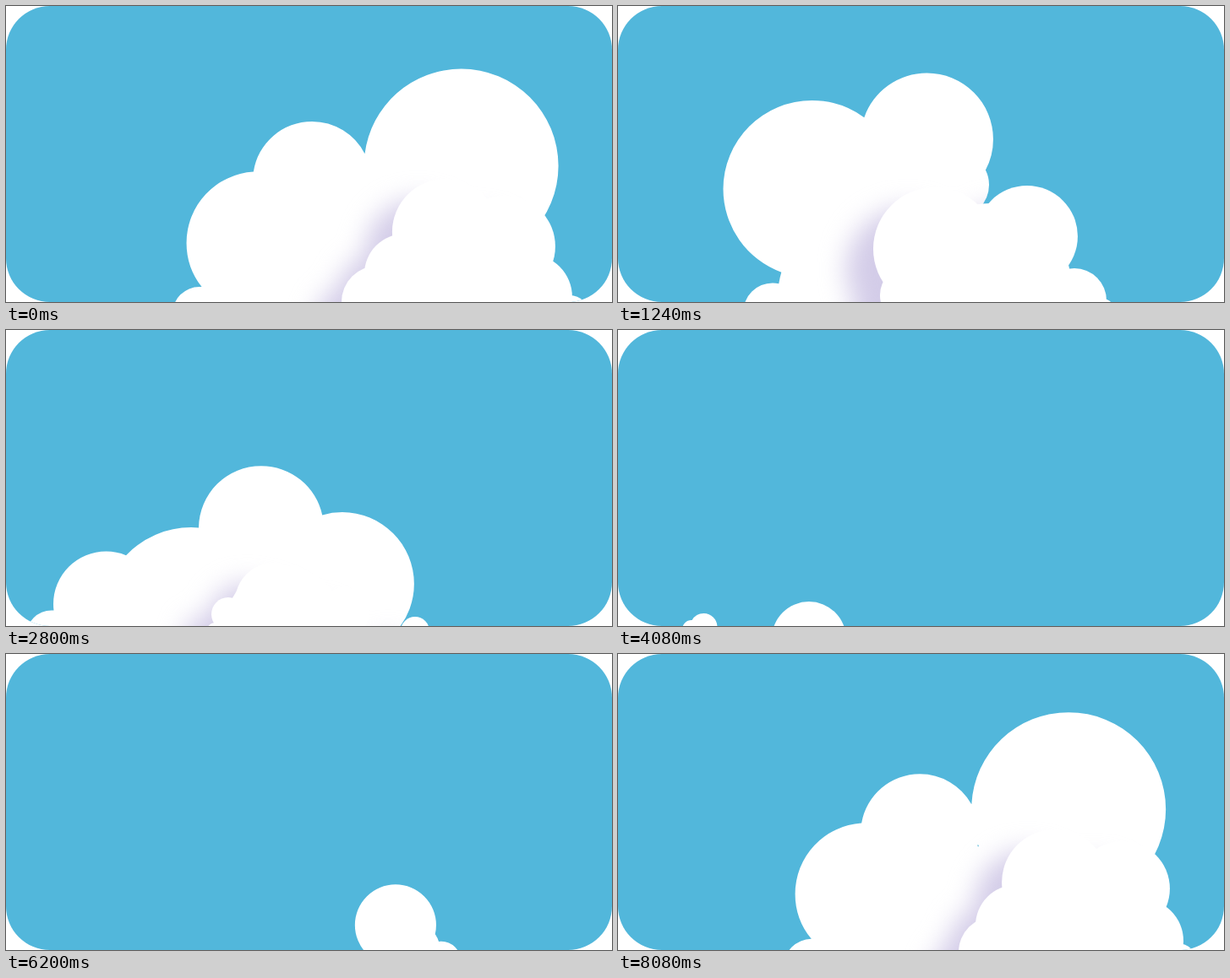
Recreate the animation shown at these times as an HTML page without scripts. Size 717x351 px, loop 8120 ms.

```html
<!DOCTYPE html>
<html lang="en">
<head>
<meta charset="utf-8">
<title>Drifting cloud</title>
<style>
html, body { margin: 0; width: 100%; height: 100%; overflow: hidden; background: #fff; }
svg { display: block; width: 100vw; height: 100vh; }
circle { animation: 8.12s linear infinite; }

/* back puffs */
.left { animation-name: left; }
.top { animation-name: top; }
.big { animation-name: big; }
.low { animation-name: low; }
.tip { animation-name: tip; }
.ear { animation-name: ear; }
.side { animation-name: side; }
.core { animation-name: core; }

/* front puffs */
.f-head { animation-name: f-head; }
.f-right { animation-name: f-right; }
.f-low { animation-name: f-low; }
.f-left { animation-name: f-left; }
.f-foot { animation-name: f-foot; }
.f-tip { animation-name: f-tip; }
.f-core { animation-name: f-core; }

@keyframes left {
  0%, to { cx: 298px; cy: 281px; r: 84.5px }
  2.956% { cx: 312px; cy: 263px; r: 88px }
  15.271% { cx: 229.5px; cy: 217px; r: 105px }
  34.483% { cx: 219px; cy: 340px; r: 106px }
  50.246% { cx: 160px; cy: 425px; r: 50px }
  58.13% { cx: 160px; cy: 440px; r: 0px }
  67.98% { cx: 500px; cy: 380px; r: 25px }
  76.355% { cx: 461px; cy: 321.5px; r: 48px }
  88.177% { cx: 362.5px; cy: 224.5px; r: 105px }
  97.537% { cx: 283px; cy: 290px; r: 85px }
  99.507% { cx: 293.5px; cy: 284.5px; r: 84px }
}
@keyframes top {
  0%, to { cx: 362px; cy: 207px; r: 70px }
  2.956% { cx: 380px; cy: 185px; r: 72px }
  15.271% { cx: 365.5px; cy: 158px; r: 78.5px }
  23.15% { cx: 335px; cy: 133px; r: 78px }
  34.483% { cx: 302px; cy: 235px; r: 74px }
  41.38% { cx: 266px; cy: 312px; r: 60px }
  50.246% { cx: 226px; cy: 366px; r: 44px }
  58.13% { cx: 190px; cy: 380px; r: 28px }
  67.98% { cx: 490px; cy: 390px; r: 0px }
  76.355% { cx: 455px; cy: 335px; r: 15px }
  88.177% { cx: 365px; cy: 235px; r: 60px }
  97.537% { cx: 341px; cy: 232px; r: 69px }
  99.507% { cx: 357px; cy: 212.5px; r: 70px }
}
@keyframes big {
  0%, to { cx: 538.5px; cy: 189.5px; r: 115px }
  2.956% { cx: 560px; cy: 214px; r: 112px }
  15.271% { cx: 400px; cy: 212px; r: 39px }
  34.483% { cx: 398px; cy: 301px; r: 85px }
  41.38% { cx: 331px; cy: 345px; r: 72px }
  50.246% { cx: 280px; cy: 410px; r: 30px }
  58.13% { cx: 280px; cy: 420px; r: 0px }
  67.98% { cx: 530px; cy: 390px; r: 10px }
  76.355% { cx: 515px; cy: 364px; r: 23px }
  88.177% { cx: 496px; cy: 174px; r: 75px }
  97.537% { cx: 513px; cy: 170px; r: 115px }
  99.507% { cx: 533px; cy: 184px; r: 115px }
}
@keyframes low {
  0%, to { cx: 229px; cy: 365px; r: 32px }
  15.271% { cx: 183px; cy: 363px; r: 34.5px }
  23.15% { cx: 125px; cy: 345px; r: 58px }
  34.483% { cx: 118.5px; cy: 325px; r: 62.5px }
  50.246% { cx: 101.5px; cy: 352px; r: 16px }
  58.13% { cx: 85px; cy: 368px; r: 8px }
  67.98% { cx: 440px; cy: 420px; r: 0px }
  76.355% { cx: 420px; cy: 400px; r: 20px }
  88.177% { cx: 328px; cy: 372px; r: 41px }
  99.507% { cx: 229px; cy: 371px; r: 33px }
}
@keyframes tip {
  0%, 23.15%, 58.13%, to { cx: 90px; cy: 380px; r: 0px }
  34.483% { cx: 54px; cy: 363px; r: 30.5px }
  50.246% { cx: 87px; cy: 355px; r: 11px }
}
@keyframes ear {
  0%, to { cx: 560px; cy: 217px; r: 60px }
  15.271% { cx: 410px; cy: 230px; r: 0px }
  67.98% { cx: 520px; cy: 400px; r: 0px }
  76.355% { cx: 500px; cy: 375px; r: 15px }
  88.177% { cx: 526px; cy: 212px; r: 41px }
  99.507% { cx: 557px; cy: 213px; r: 60px }
}
@keyframes side {
  0%, to { cx: 502px; cy: 276px; r: 40px }
  15.271% { cx: 420px; cy: 300px; r: 0px }
  67.98% { cx: 490px; cy: 410px; r: 0px }
  76.355% { cx: 480px; cy: 380px; r: 20px }
  88.177% { cx: 475px; cy: 274px; r: 51px }
  99.507% { cx: 500px; cy: 280px; r: 40px }
}
@keyframes core {
  0%, to { cx: 400px; cy: 330px; r: 110px }
  15.271% { cx: 292px; cy: 345px; r: 103px }
  34.483% { cx: 330px; cy: 345px; r: 90px }
  41.38% { cx: 280px; cy: 380px; r: 60px }
  50.246% { cx: 200px; cy: 440px; r: 40px }
  58.13% { cx: 200px; cy: 450px; r: 0px }
  67.98% { cx: 500px; cy: 390px; r: 15px }
  76.355% { cx: 487px; cy: 348px; r: 26px }
  88.177% { cx: 420px; cy: 345px; r: 80px }
  99.507% { cx: 400px; cy: 333px; r: 108px }
}

@keyframes f-head {
  0%, to { cx: 520px; cy: 268px; r: 63px }
  15.271% { cx: 375px; cy: 288px; r: 73px }
  34.483% { cx: 317px; cy: 322px; r: 46px }
  45.813% { cx: 290px; cy: 390px; r: 0px }
  76.355% { cx: 520px; cy: 430px; r: 10px }
  88.177% { cx: 533px; cy: 341.5px; r: 54px }
  99.507% { cx: 517px; cy: 271px; r: 63px }
}
@keyframes f-right {
  0%, to { cx: 590px; cy: 285px; r: 60px }
  15.271% { cx: 484px; cy: 273px; r: 60px }
  34.483% { cx: 400px; cy: 335px; r: 30px }
  45.813% { cx: 360px; cy: 390px; r: 0px }
  76.355% { cx: 540px; cy: 420px; r: 10px }
  88.177% { cx: 565px; cy: 352px; r: 35px }
  97.537% { cx: 600px; cy: 254px; r: 54px }
  99.507% { cx: 597px; cy: 278px; r: 56px }
}
@keyframes f-low {
  0%, to { cx: 619px; cy: 345px; r: 51px }
  15.271% { cx: 540px; cy: 349px; r: 38px }
  34.483% { cx: 484px; cy: 357px; r: 17px }
  45.813% { cx: 450px; cy: 390px; r: 0px }
  76.355% { cx: 550px; cy: 420px; r: 0px }
  88.177% { cx: 560px; cy: 375px; r: 20px }
  99.507% { cx: 619px; cy: 340px; r: 50px }
}
@keyframes f-left {
  0%, to { cx: 472px; cy: 318px; r: 48px }
  15.271% { cx: 345px; cy: 343px; r: 35px }
  34.483% { cx: 263px; cy: 337px; r: 20px }
  45.813% { cx: 240px; cy: 380px; r: 0px }
  76.355% { cx: 510px; cy: 420px; r: 0px }
  88.177% { cx: 505px; cy: 378px; r: 25px }
  99.507% { cx: 471px; cy: 322px; r: 48px }
}
@keyframes f-foot {
  0%, to { cx: 440px; cy: 351px; r: 43px }
  15.271% { cx: 380px; cy: 350px; r: 35px }
  34.483% { cx: 248px; cy: 358px; r: 11px }
  45.813% { cx: 230px; cy: 380px; r: 0px }
  76.355% { cx: 510px; cy: 420px; r: 0px }
  88.177% { cx: 505px; cy: 390px; r: 20px }
  99.507% { cx: 446px; cy: 354px; r: 43px }
}
@keyframes f-tip {
  0%, to { cx: 667px; cy: 366px; r: 23px }
  15.271% { cx: 573px; cy: 362px; r: 15px }
  34.483% { cx: 520px; cy: 380px; r: 0px }
  76.355% { cx: 590px; cy: 420px; r: 0px }
  88.177% { cx: 600px; cy: 385px; r: 10px }
  99.507% { cx: 662px; cy: 366px; r: 23px }
}
@keyframes f-core {
  0%, to { cx: 530px; cy: 345px; r: 90px }
  15.271% { cx: 440px; cy: 330px; r: 96px }
  34.483% { cx: 330px; cy: 350px; r: 70px }
  45.813% { cx: 290px; cy: 400px; r: 0px }
  76.355% { cx: 530px; cy: 420px; r: 10px }
  88.177% { cx: 540px; cy: 365px; r: 50px }
  99.507% { cx: 528px; cy: 347px; r: 90px }
}
</style>
</head>
<body>
<svg viewBox="0 0 717 351">
  <defs>
    <clipPath id="card"><rect width="717" height="351" rx="52"/></clipPath>
    <clipPath id="back">
      <circle class="left"/>
      <circle class="top"/>
      <circle class="big"/>
      <circle class="low"/>
      <circle class="tip"/>
      <circle class="ear"/>
      <circle class="side"/>
      <circle class="core"/>
    </clipPath>
    <filter id="soft" filterUnits="userSpaceOnUse" x="-100" y="-100" width="920" height="620" color-interpolation-filters="sRGB">
      <feGaussianBlur stdDeviation="15"/>
    </filter>
  </defs>
  <g clip-path="url(#card)">
    <rect width="717" height="351" fill="#52b7db"/>
    <!-- the shadow falls on the back puffs only -->
    <g clip-path="url(#back)">
      <rect width="717" height="351" fill="#fff"/>
      <g filter="url(#soft)">
        <g transform="translate(-32 25)" fill="#d3cce8">
          <circle class="f-head"/>
          <circle class="f-right"/>
          <circle class="f-low"/>
          <circle class="f-left"/>
          <circle class="f-foot"/>
          <circle class="f-tip"/>
          <circle class="f-core"/>
        </g>
      </g>
    </g>
    <g fill="#fff">
      <circle class="f-head"/>
      <circle class="f-right"/>
      <circle class="f-low"/>
      <circle class="f-left"/>
      <circle class="f-foot"/>
      <circle class="f-tip"/>
      <circle class="f-core"/>
    </g>
  </g>
</svg>
</body>
</html>
```
